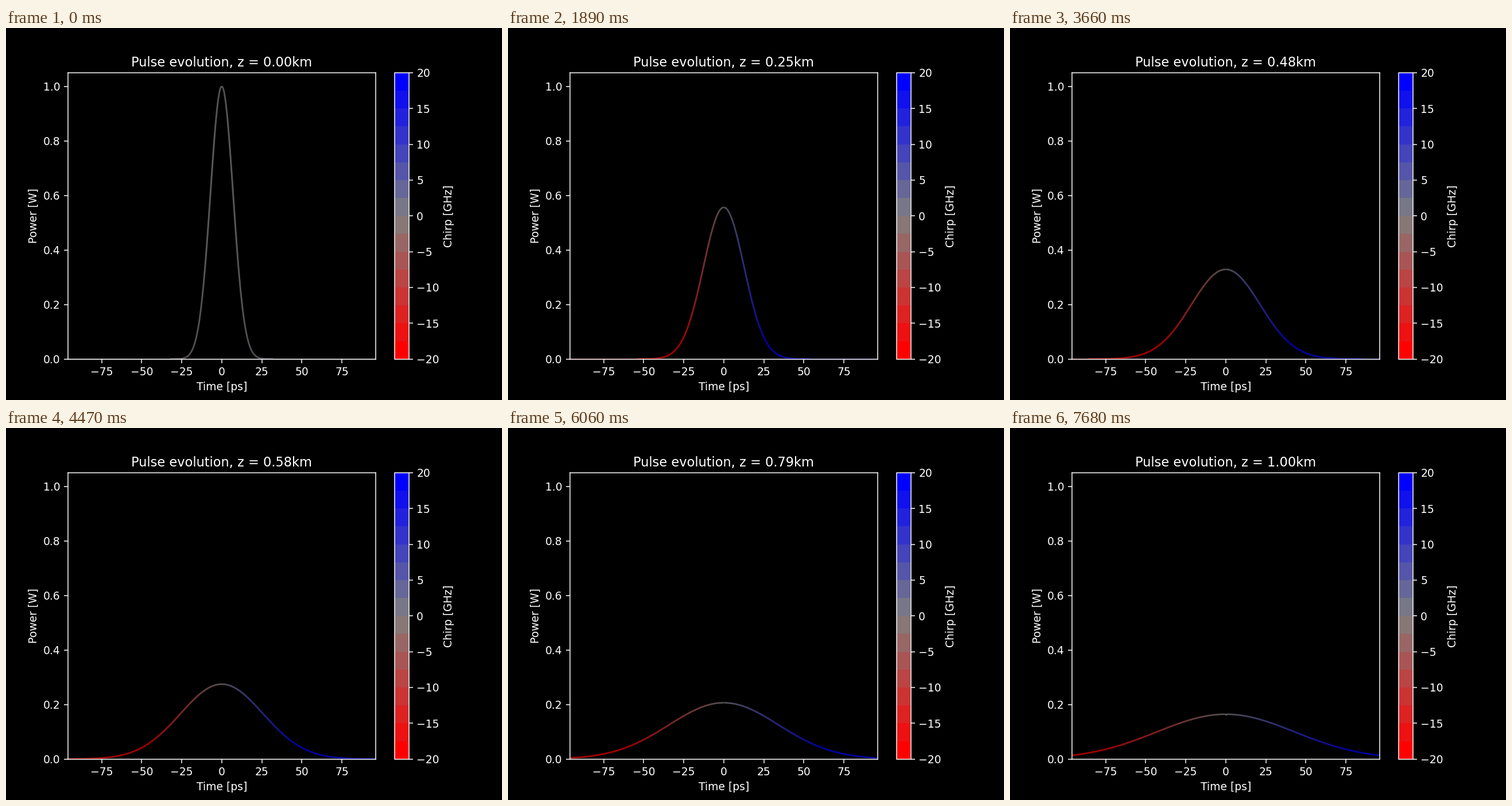
Recreate the animation shown at these times as a matplotlib script. Size 864 by 648 pixels, loop 7710 ms.

```python
import numpy as np
import matplotlib.pyplot as plt
from matplotlib.animation import FuncAnimation
from matplotlib.cm import ScalarMappable
from matplotlib.collections import LineCollection
from matplotlib.colors import BoundaryNorm, LinearSegmentedColormap, ListedColormap, Normalize
from matplotlib.transforms import IdentityTransform

W, H, DPI = 864, 648, 135
FRAMES, INTERVAL = 257, 30
T_MAX = 96.0        # ps
T0 = 10.0           # ps, initial pulse width
DISPERSION = 6.0    # fibre length in units of dispersion length, per km
DT = 0.01           # ps, fine time step that sets line density
FLAT = 1e-4         # px, rise per time step below which the line snaps
STEP = 0.5          # px, length of the drawn pieces

plt.style.use("dark_background")
plt.rcParams["font.family"] = "DejaVu Sans"

fig, ax = plt.subplots(figsize=(W / DPI, H / DPI), dpi=DPI)
ramp = LinearSegmentedColormap.from_list("chirp", ["red", "gray", "blue"])
norm = Normalize(-20, 20)

bands = ListedColormap(ramp(np.linspace(0, 1, 16)))
levels = np.linspace(-20, 20, 17)
cbar = fig.colorbar(ScalarMappable(BoundaryNorm(levels, 16), bands), ax=ax,
                    ticks=np.arange(-20, 21, 5), label="Chirp [GHz]")
cbar.minorticks_off()

ax.set(xlim=(-T_MAX, T_MAX), ylim=(0, 1.05), xlabel="Time [ps]", ylabel="Power [W]")
title = ax.set_title("")

box = ax.bbox
PX = box.width / (2 * T_MAX)
PY = box.height / 1.05
MID = box.x0 + box.width / 2

curve = LineCollection([], linewidths=1.5, transform=IdentityTransform())
curve.set_snap(False)
ax.add_collection(curve, autolim=False)

grid = np.linspace(-T_MAX, T_MAX, 4001)
columns = np.arange(int(box.x0), int(box.x1) + 1) + 0.5


def power(t, x):
    s = 1 + x * x
    return np.exp(-(t / T0) ** 2 / s) / np.sqrt(s)


def rise(t, x):
    """Height change in pixels over one fine time step."""
    return np.abs(2 * t / (T0 ** 2 * (1 + x * x)) * power(t, x)) * PY * DT


def colors(t, x, alpha):
    chirp = 1e3 * t * x / (T0 ** 2 * (1 + x * x)) / (2 * np.pi)
    rgba = ramp(norm(chirp))
    rgba[:, 3] = alpha
    return rgba


def height(t, x):
    return box.y0 + PY * power(t, x)


def pieces(x0, y0, x1, y1):
    return np.stack([np.column_stack([x0, y0]), np.column_stack([x1, y1])], axis=1)


def sloped(x):
    """Short translucent pieces, evenly spaced along the curve."""
    length = np.hypot(np.diff(grid) * PX, np.diff(height(grid, x)))
    arc = np.concatenate([[0], np.cumsum(length)])
    t = np.interp(np.arange(0, arc[-1], STEP), arc, grid)
    mid = (t[1:] + t[:-1]) / 2
    keep = rise(mid, x) >= FLAT
    px, py = MID + t * PX, height(t, x)
    segs = pieces(px[:-1], py[:-1], px[1:], py[1:])[keep]
    mid = mid[keep]
    # overlapping antialiased edges leave the line partly transparent
    fine = np.hypot(DT * PX, rise(mid, x))
    depth = -np.log(1 - fine) / fine
    return segs, colors(mid, x, (1 - np.exp(-depth * STEP)) / STEP)


def level(x):
    """Pixel-aligned pieces where the curve is practically flat."""
    t = (columns - MID) / PX
    keep = rise(t, x) < FLAT
    t, px = t[keep], columns[keep]
    py = H - (np.floor(H - height(t, x) + 0.5) + 0.5)
    return pieces(px, py, px + 1, py), colors(t, x, 1)


def update(i):
    z = (i + 1) / FRAMES
    x = DISPERSION * z
    (s1, c1), (s2, c2) = sloped(x), level(x)
    curve.set_segments(np.concatenate([s1, s2]))
    curve.set_color(np.concatenate([c1, c2]))
    title.set_text(f"Pulse evolution, z = {z:.2f}km")
    return curve, title


anim = FuncAnimation(fig, update, frames=FRAMES, interval=INTERVAL,
                     init_func=lambda: update(0), repeat=True, repeat_delay=0)
plt.show()
```
